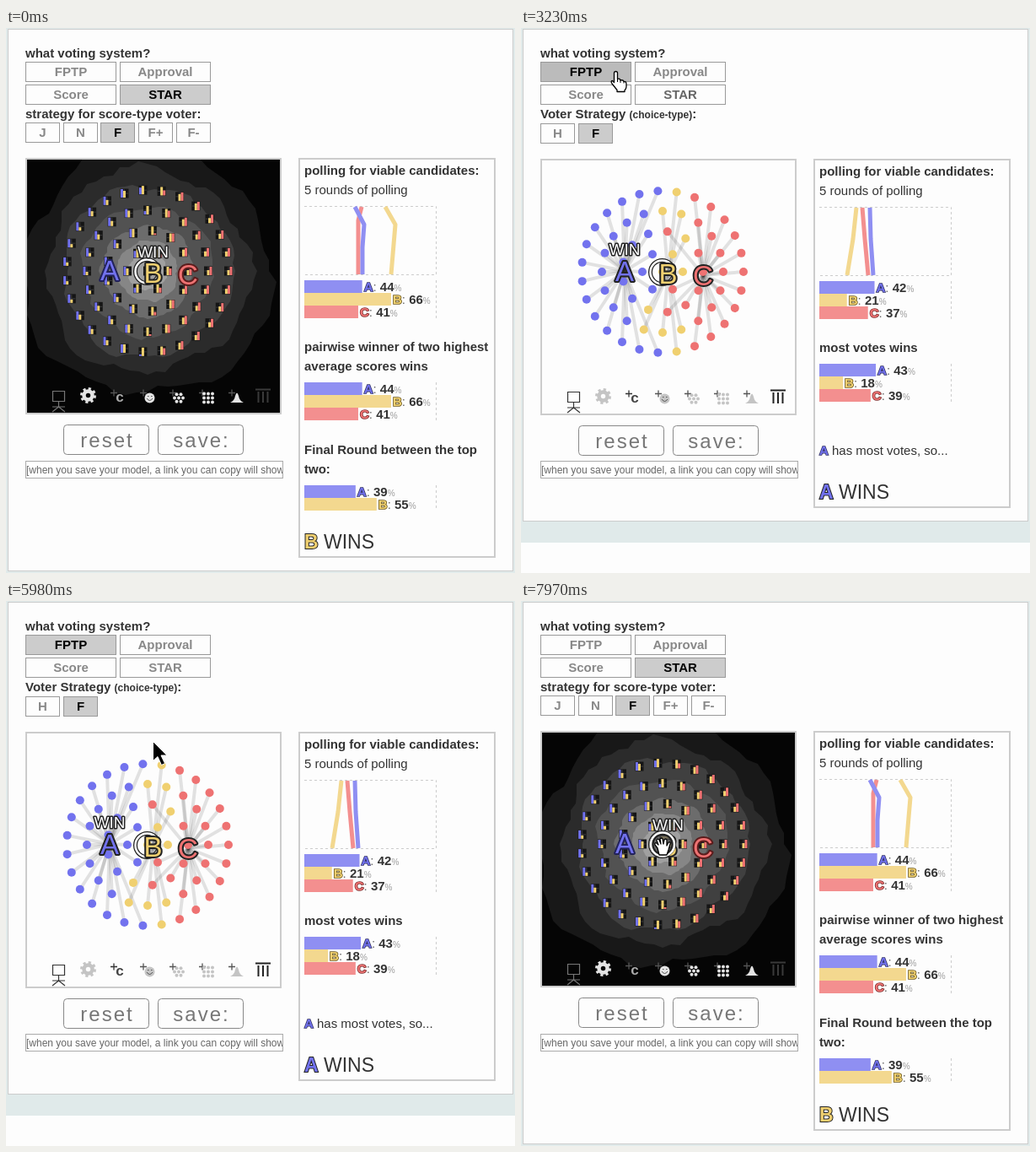
Recreate the animation shown at these times as an HTML page. Size 604 px wide and 646 px high, loop 8000 ms.

```html
<!DOCTYPE html>
<html lang="en">
<head>
<meta charset="utf-8">
<title>Voting sandbox</title>
<style>
html, body { margin: 0; width: 100%; height: 100%; overflow: hidden; background: #fdfdfd; }
svg { display: block; width: 604px; height: 646px; font: 15px "Liberation Sans", Arial, sans-serif; fill: #333; }
.b { font-weight: bold; }
</style>
</head>
<body>
<svg id="stage" viewBox="0 0 604 646"></svg>
<script>
const LOOP = 8000;
const stage = document.getElementById('stage');
const HUE = { A: '#7272ee', B: '#f0d070', C: '#ee7272' };
const BAR = { A: '#8f8ff2', B: '#f3d88f', C: '#f38f8f' };
const EDGE = { A: '#333366', B: '#6b571c', C: '#7a2c2c' };
const SPOT = { A: [123, 287], B: [174.5, 290], C: [216, 292] };
const CENTER = [168, 288];

const attrs = o => Object.entries(o).map(([k, v]) => `${k}="${v}"`).join(' ');
const el = (tag, o, inner = '') => `<${tag} ${attrs(o)}>${inner}</${tag}>`;
const text = (x, y, s, o = {}) => el('text', { x, y, ...o }, s);
const bold = (x, y, s, o = {}) => text(x, y, s, { class: 'b', ...o });
const rect = (x, y, width, height, o = {}) => el('rect', { x, y, width, height, ...o });
const path = (d, o = {}) => el('path', { d, fill: 'none', ...o });
const circle = (cx, cy, r, o = {}) => el('circle', { cx, cy, r, ...o });
const frame = (x, y, w, h) => rect(x + 1, y + 1, w - 2, h - 2, { fill: '#fdfdfd', stroke: '#ccc', 'stroke-width': 2 });
const dashes = d => path(d, { stroke: '#ccc', 'stroke-dasharray': '3 3' });

function button(x, y, w, label, on, id = 'x') {
  return `<g class="btn-${id}">` +
    rect(x + .5, y + .5, w - 1, 23, { fill: on ? '#ccc' : '#fdfdfd', stroke: '#999' }) +
    bold(x + w / 2, y + 17, label, { fill: on ? '#000' : '#888', 'text-anchor': 'middle' }) + '</g>';
}

const letter = (k, o) => el('tspan', {
  class: 'b', fill: HUE[k], stroke: EDGE[k], 'stroke-width': 1.6, 'paint-order': 'stroke', ...o }, k);

function bars(y, scores) {
  const rows = Object.entries(scores);
  return rows.map(([k, pct], i) => {
    const w = pct * 1.56, top = y + 15 * i;
    return rect(354, top, w, 15, { fill: BAR[k] }) +
      text(356 + w, top + 13, letter(k) + '<tspan fill="#666">: </tspan>' +
        `<tspan class="b">${pct}</tspan><tspan font-size="10" fill="#999">%</tspan>`);
  }).join('') + dashes(`M510.5 ${y}v${15 * rows.length}`);
}

const trend = (k, d) => path(d, { stroke: BAR[k], 'stroke-width': 5, 'stroke-linejoin': 'round' });
const poll = (y, lines) => bold(354, y + 20, 'polling for viable candidates:') +
  text(354, y + 43, '5 rounds of polling', { }) +
  dashes(`M354 ${y + 57.5}H510.5V${y + 138.5}H354`) + lines;
const verdict = (k, y) => text(354, y, letter(k, { stroke: '#222', 'stroke-width': 2 }) + ' WINS', { 'font-size': 23 });

// Concentric rings of evenly spaced voters.
const voters = [1, 6, 13, 20, 27].flatMap((n, ring) =>
  Array.from({ length: n }, (_, i) => {
    const a = i / n * Math.PI * 2;
    return { x: CENTER[0] + 24 * ring * Math.cos(a), y: CENTER[1] + 24 * ring * Math.sin(a), key: ring + ':' + i };
  }));

const swayed = { '1:1': 'C', '2:2': 'C', '2:3': 'C', '2:10': 'C', '2:4': 'B', '3:6': 'B' };
const choice = v => swayed[v.key] || (v.x < 165 ? 'A' : v.x < 200 ? 'B' : 'C');

function plainField() {
  return voters.map(v => {
    const [x, y] = SPOT[choice(v)];
    return path(`M${v.x} ${v.y}L${x} ${y}`, { stroke: '#000', 'stroke-opacity': .11, 'stroke-width': 4 });
  }).join('') + voters.map(v => circle(v.x, v.y, 5, { fill: HUE[choice(v)] })).join('');
}

function ballot(v) {
  const keys = ['A', 'B', 'C'];
  const far = keys.map(k => Math.hypot(v.x - SPOT[k][0], v.y - SPOT[k][1]));
  const lo = Math.min(...far), hi = Math.max(...far);
  const cells = keys.map((k, i) => {
    const h = Math.round((hi - far[i]) / (hi - lo) * 5) * 2;
    return rect(v.x - 4.5 + 3 * i, v.y + 5 - h, 3, h, { fill: HUE[k] });
  }).join('');
  return rect(v.x - 5, v.y - 5.5, 10, 11, { fill: '#151515' }) +
    path(`M${v.x - 4.5} ${v.y}h9M${v.x} ${v.y - 5}v10`, { stroke: '#444', 'stroke-width': .8 }) + cells;
}

function scoreField() {
  let seed = 7;
  const random = () => (seed = seed * 16807 % 2147483647) / 2147483647;
  const levels = [[147, '#181818'], [121, '#2b2b2b'], [101, '#404040'], [77, '#525252'], [54, '#6c6c6c'], [36, '#868686'], [23, '#a0a0a0']];
  const blobs = levels.map(([r, fill], k) => {
    const points = Array.from({ length: 72 }, (_, i) => {
      const a = i / 72 * Math.PI * 2;
      const d = r * (1 + .035 * Math.sin(3 * a + k) + .03 * Math.sin(8 * a + 2 * k) + .045 * (random() - .5));
      return [CENTER[0] + d * Math.cos(a), CENTER[1] + d * Math.sin(a)].map(Math.round).join();
    });
    return el('polygon', { points: points.join(' '), fill });
  }).join('');
  return rect(25, 156, 300, 300, { fill: '#050505' }) +
    `<clipPath id="field"><rect x="25" y="156" width="300" height="300"/></clipPath><g clip-path="url(#field)">${blobs}</g>` +
    voters.map(ballot).join('');
}

const outlined = (x, y, s, size, fill, stroke, w) => text(x, y, s, {
  'font-size': size, fill, stroke, 'stroke-width': w, 'paint-order': 'stroke', 'stroke-linejoin': 'round', 'text-anchor': 'middle' });

function candidates(winner, ring, edges) {
  const halo = circle(167.5, 288.5, 14, { fill: 'none', stroke: '#222', 'stroke-width': 5 }) +
    circle(167.5, 288.5, 14, { fill: 'none', stroke: ring, 'stroke-width': 2.5 });
  return halo + ['A', 'B', 'C'].map(k => outlined(SPOT[k][0], SPOT[k][1] + 12, k, 33, HUE[k], edges[k] || '#222', 4)).join('') +
    outlined(SPOT[winner][0], winner === 'A' ? 268 : 272, 'WIN', 19, '#fff', '#222', 3);
}

function toolbar(board, gear, add, bin) {
  const plus = (x, tone) => path(`M${x - 4} 432.5h8m-4-4v8`, { stroke: tone, 'stroke-width': 1.3 });
  const dots = (cx, list) => list.map(([x, y]) => circle(cx + x, 438.5 + y, 2, { fill: gear })).join('');
  const hex = [[0, 0], ...Array.from({ length: 6 }, (_, i) => [5 * Math.cos(i * Math.PI / 3), 5 * Math.sin(i * Math.PI / 3)])];
  const grid = Array.from({ length: 9 }, (_, i) => [(i % 3 - 1) * 5, (Math.floor(i / 3) - 1) * 5]);
  return path('M55.5 430.5h14v12h-14zM62.5 443v6M55 455l7.5-6 7.5 6M55 449h15', { stroke: board, 'stroke-width': 1.2 }) +
    circle(97.5, 435.5, 5, { fill: 'none', stroke: gear, 'stroke-width': 4.5 }) +
    circle(97.5, 435.5, 8, { fill: 'none', stroke: gear, 'stroke-width': 3, 'stroke-dasharray': '3.14 3.14' }) +
    [128, 163, 198, 233, 268].map((x, i) => plus(x, i ? add : bin === '#222' ? '#333' : add)).join('') +
    bold(135, 443, 'c', { 'font-size': 17, 'text-anchor': 'middle', fill: bin === '#222' ? '#444' : '#aaa' }) +
    circle(170.5, 438.5, 6, { fill: gear }) + path('M167 439q3.500 5 7 0M168 436.500h1.500m2.500 0h1.500', { stroke: '#555' }) +
    dots(205, hex) + dots(240, grid) +
    path('M266 444q5-2 6-8 2-7 4 0 1 6 6 8z', { fill: gear }) +
    path('M296 428.500h18M299.500 431v13m5.500-13v13m5.500-13v13', { stroke: bin, 'stroke-width': 2 });
}

const controls = dy => `<g transform="translate(0 ${dy})">` + [[68, 'reset', 'reset'], [180, 'save:', 'save']].map(([x, s, id]) =>
  `<g class="btn-${id}">` + rect(x + .5, 470.5, 101, 35, { rx: 4, fill: '#fdfdfd', stroke: '#888' }) +
  text(x + 52, 497, s, { 'font-size': 24, 'letter-spacing': 2, 'text-anchor': 'middle', fill: '#777' }) + '</g>').join('') + '</g>' +
  rect(23.5, 513.5, 305, 20, { fill: '#fff', stroke: '#aaa' }) +
  '<svg x="24" y="514" width="304" height="19">' +
  text(0, 14, '[when you save your model, a link you can copy will show up here]', { 'font-size': 12, fill: '#666' }) + '</svg>';

const scoreScene = rect(0, 0, 604, 646, { fill: '#e0eaea' }) +
  rect(2.5, 1.5, 599, 642, { fill: '#fdfdfd', stroke: '#ccc' }) +
  bold(23, 107, 'strategy for score-type voter:') +
  ['J', 'N', 'F', 'F+', 'F-'].map((s, i) => button(Math.round(23 + 44.7 * i), 112, 41, s, s === 'F')).join('') +
  frame(23, 154, 304, 304) + scoreField() + toolbar('#777', '#e4e4e4', '#555', '#3a3a3a') +
  candidates('B', '#fff', { A: '#22225a', C: '#5a1c1c' }) +
  controls(0) + frame(347, 154, 234, 474) +
  poll(154, trend('C', 'M422 212L418 228V292') + trend('A', 'M414 212L425 233L423 260V292') + trend('B', 'M450 212L462 233L457 292')) +
  bars(299, { A: 44, B: 66, C: 41 }) +
  bold(354, 383, 'pairwise winner of two highest') + bold(354, 406, 'average scores wins') +
  bars(420, { A: 44, B: 66, C: 41 }) +
  bold(354, 505, 'Final Round between the top') + bold(354, 528, 'two:') +
  bars(542, { A: 39, B: 55 }) + verdict('B', 617);

const choiceScene = rect(0, 0, 604, 610, { fill: '#e0eaea' }) +
  rect(2.5, 1.5, 599, 583, { fill: '#fdfdfd', stroke: '#ccc' }) +
  bold(23, 107, 'Voter Strategy <tspan font-size="12">(choice-type)</tspan>:') +
  button(23, 113, 41, 'H') + button(68, 113, 41, 'F', true) +
  frame(23, 155, 304, 304) +
  `<g transform="translate(0 1)">${plainField()}${toolbar('#333', '#c4c4c4', '#555', '#222')}${candidates('A', '#fff', {})}</g>` +
  controls(1) + frame(347, 155, 234, 414) +
  poll(155, trend('B', 'M398 213L394 250L387 293') + trend('C', 'M405 213L408 250L412 293') + trend('A', 'M414 213L415 250L418 293')) +
  bars(300, { A: 42, B: 21, C: 37 }) +
  bold(354, 384, 'most votes wins') + bars(398, { A: 43, B: 18, C: 39 }) +
  text(354, 506, letter('A') + ' has most votes, so...') + verdict('A', 558);

const skin = { fill: '#fff', stroke: '#000', 'stroke-width': 1.3, 'stroke-linejoin': 'round' };
const cursors = {
  arrow: path('M.5.5V23.500l5.500-5 4.500 10 4-2-4.500-9.500h7z', { fill: '#000', stroke: '#fff', 'stroke-width': 1 }),
  hand: path('M-3.500 2.500q0-2 2-2t2 2v7q3-1 3.500 1.500 3-1 4 1.500 3-.5 3 3v3q0 2-2 4.500v1.500h-9v-2l-6-7.500q-2-3 .5-3.500l2 2z', skin) +
    path('M.5 9v4M4 11v3M8 12.500v2', { stroke: '#000' }),
  grab: path('M-6 11l-3-4q-1-3 2-2l2 2-2-5q0-3 3-1l2 5-1-6q2-2 3 0l1 6 1-5q3-2 3 1v6l2-4q3-1 2 2l-2 7-2 6h-9z', skin)
};

stage.innerHTML = `<g id="score">${scoreScene}</g><g id="choice">${choiceScene}</g>` +
  bold(23, 35, 'what voting system?') +
  button(23, 40, 108, 'FPTP', false, 'fptp') + button(135, 40, 108, 'Approval') +
  button(23, 67, 108, 'Score') + button(135, 67, 108, 'STAR', true, 'star') +
  '<g id="held">' + circle(168, 288.5, 13, { fill: '#555', 'fill-opacity': .75, stroke: '#222', 'stroke-width': 5 }) +
  circle(168, 288.5, 14, { fill: 'none', stroke: '#fff', 'stroke-width': 2.5 }) + '</g>' +
  Object.entries(cursors).map(([k, s]) => `<g id="${k}">${s}</g>`).join('');

// time, x, y, shape
const track = [
  [0, 0, 0, ''], [400, 5, 630, 'arrow'], [550, 48, 606], [670, 104, 574], [820, 156, 534], [940, 212, 484, 'hand'],
  [1060, 250, 391, 'arrow'], [1210, 233, 313], [1360, 195, 189], [1510, 160, 124], [1670, 146, 99],
  [1810, 140, 82, 'hand'], [1930, 129, 67], [2050, 121, 58], [2170, 116, 53], [2290, 114, 51],
  [3910, 113, 88, 'arrow'], [4030, 112, 140], [4180, 115, 212], [4310, 117, 253], [4430, 118, 258], [4550, 119, 260],
  [4690, 122, 260], [4810, 125, 261], [4960, 125, 263], [5100, 142, 272], [5220, 157, 277], [5340, 167, 275],
  [5590, 171, 267], [5710, 173, 255], [5830, 175, 241], [5980, 174, 166], [6100, 178, 115],
  [6250, 186, 90, 'hand'], [6370, 188, 83], [6490, 188, 81], [7220, 165, 130, 'arrow'],
  [7370, 160, 182], [7490, 162, 240], [7610, 168, 282, 'grab']
];
// time, FPTP fill and ink, STAR fill and ink
const looks = [
  [0, '#fdfdfd', '#888', '#ccc', '#000'], [1930, '#eee', '#888', '#ccc', '#000'], [2050, '#ddd', '#888', '#ccc', '#000'],
  [3230, '#bbb', '#000', '#fdfdfd', '#666'], [3350, '#ccc', '#000', '#fdfdfd', '#888'],
  [6250, '#ccc', '#000', '#eee', '#888'], [6370, '#ccc', '#000', '#ddd', '#888'],
  [6730, '#ccc', '#000', '#333', '#777'], [6850, '#fdfdfd', '#888', '#ccc', '#000']
];
let shape = '';
track.forEach(step => { shape = step[3] = step[3] ?? shape; });

const find = s => stage.querySelector(s);
const at = (table, t) => table.findLast(step => step[0] <= t);
const show = (id, on) => find('#' + id).setAttribute('display', on ? 'inline' : 'none');
function paint(id, fill, ink) {
  find(`.btn-${id} rect`).setAttribute('fill', fill);
  find(`.btn-${id} text`).setAttribute('fill', ink);
}

function draw(now) {
  const t = now % LOOP;
  const [, x, y, kind] = at(track, t);
  const [, fill1, ink1, fill2, ink2] = at(looks, t);
  const choosing = t >= 3230 && t < 6730;
  show('score', !choosing);
  show('choice', choosing);
  show('held', kind === 'grab');
  paint('fptp', fill1, ink1);
  paint('star', fill2, ink2);
  paint('save', t >= 940 && t < 1210 ? '#ddd' : '#fdfdfd', '#777');
  for (const k in cursors) show(k, k === kind);
  if (kind) find('#' + kind).setAttribute('transform', `translate(${x} ${y})`);
}

const start = performance.now();
function tick() {
  draw(performance.now() - start);
  requestAnimationFrame(tick);
}
tick();
</script>
</body>
</html>
```
